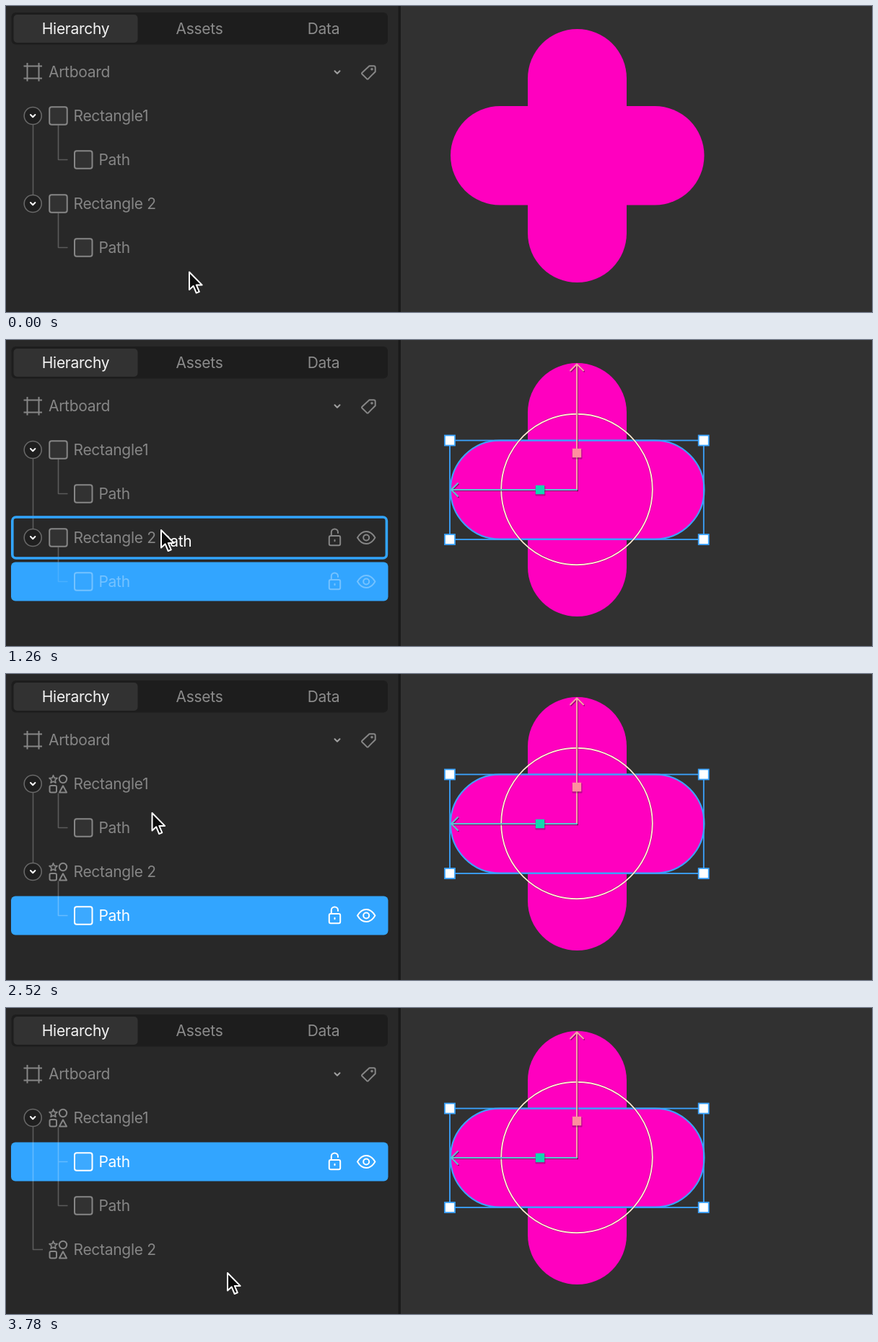
Animation, 1200 px wide and 425 px high, one loop 3990 ms. Source, as an HTML page:

```html
<!DOCTYPE html>
<html lang="en">
<head>
<meta charset="utf-8">
<title>Layer drag</title>
<style>
  html, body { margin: 0; width: 100%; height: 100%; overflow: hidden; background: #282828; }
  svg { display: block; width: 100vw; height: 100vh; }
  text { font: 400 21px Inter, "Liberation Sans", sans-serif; letter-spacing: -.3px; }
  .line { fill: none; stroke-width: 2; stroke-linecap: round; stroke-linejoin: round; }
</style>
</head>
<body>
<svg viewBox="0 0 1200 425">
  <rect width="546" height="425" fill="#282828"/>
  <rect x="546" width="654" height="425" fill="#313131"/>
  <rect x="543.5" width="3.5" height="425" fill="#1a1a1a"/>
  <rect x="7.5" y="9" width="521.5" height="44.5" rx="6" fill="#1d1d1d"/>
  <rect x="10.5" y="12" width="172" height="39" rx="5" fill="#323232"/>
  <g text-anchor="middle" fill="#8b8b8b">
    <text x="96.5" y="39.3" fill="#f4f4f4">Hierarchy</text>
    <text x="268" y="39.3">Assets</text>
    <text x="440" y="39.3">Data</text>
  </g>
  <g class="line" stroke="#868686">
    <path d="M24.5 83.5H50M24.5 100.5H50M29.5 79V104.5M45.5 79V104.5" stroke-linecap="butt"/>
    <path d="M455.5 90.2L459 93.8L462.5 90.2" stroke="#a0a0a0"/>
    <path d="M503.5 83.2H509.5Q511.7 83.2 511.7 85.4V91.2L502.2 100.9Q501 102 499.8 100.9L493.6 94.8Q492.5 93.6 493.6 92.4Z"/>
    <circle cx="507" cy="87.8" r=".8"/>
  </g>
  <text x="59" y="99.3" fill="#868686">Artboard</text>
  <g fill="#ff00bf">
    <rect x="723" y="32" width="137" height="352" rx="68.5"/>
    <rect x="616" y="139" width="351.5" height="137.5" rx="68.7"/>
  </g>
  <g id="live"></g>
</svg>
<script>
const LOOP = 3990, STEP = 70;
const GREY = '#868686', BLUE = '#32a5ff';
const ROWS = [152.5, 213.5, 274.5, 335.5];
const PRESS = 770, DRAG = 840, DROP = 2520, MOVED = 2590;

// time, x, y of the pointer tip
const TRACK = [
  [0, 253, 368], [490, 221, 343], [770, 221, 343], [840, 219.5, 342],
  [1260, 214, 262.5], [1680, 203, 219], [2240, 201.5, 191.5],
  [2520, 201.5, 191.5], [3010, 193, 236.5], [3780, 306, 366.5], [3990, 306, 366.5]
];

function slope(i, k) {
  const a = TRACK[i - 1], b = TRACK[i], c = TRACK[i + 1];
  if (!a || !c) return 0;
  const d1 = (b[k] - a[k]) / (b[0] - a[0]), d2 = (c[k] - b[k]) / (c[0] - b[0]);
  return d1 * d2 <= 0 ? 0 : 2 * d1 * d2 / (d1 + d2);
}

function pointer(t) {
  let i = 0;
  while (i < TRACK.length - 2 && t >= TRACK[i + 1][0]) i++;
  const a = TRACK[i], b = TRACK[i + 1], h = b[0] - a[0], u = (t - a[0]) / h;
  return [1, 2].map(k =>
    a[k] * (1 + 2 * u) * (1 - u) ** 2 + b[k] * u * u * (3 - 2 * u) +
    h * u * (1 - u) * (slope(i, k) * (1 - u) - slope(i + 1, k) * u));
}

const path = (d, extra = '') => `<path class="line" d="${d}" ${extra}/>`;
const box = (x, y, w, h, r, extra) =>
  `<rect x="${x}" y="${y}" width="${w}" height="${h}" rx="${r}" ${extra}/>`;
const label = (x, y, s, fill) => `<text x="${x}" y="${y + 7.3}" fill="${fill}">${s}</text>`;

const square = (x, y, c) =>
  box(x - 12, y - 12.2, 24.5, 24.5, 3, `fill="#fff" fill-opacity=".05" stroke="${c}" stroke-width="2"`);

function star(x, y) {
  let d = '';
  for (let i = 0; i < 10; i++) {
    const r = i % 2 ? 2.6 : 5.8, a = i * Math.PI / 5;
    d += (i ? 'L' : 'M') + (x + r * Math.sin(a)).toFixed(1) + ' ' + (y - r * Math.cos(a)).toFixed(1);
  }
  return d + 'Z';
}

const shapes = (x, y) => `<g class="line" stroke="${GREY}">
  <path d="${star(x - 6.5, y - 6)}" stroke-width="1.7"/>
  <circle cx="${x + 7}" cy="${y - 6.5}" r="5.2"/>
  ${box(x - 11.5, y + 2.5, 9.5, 9.5, 2, '')}
  <path d="M${x + 7} ${y + 2.8}l5 9.2h-10z"/></g>`;

const toggle = y => `<circle cx="37.2" cy="${y}" r="12" fill="#1f1f1f" stroke="#686868" stroke-width="1.6"/>` +
  path(`M34 ${y - 1.5}l3.2 3.2l3.2 -3.2`, 'stroke="#fff"');

const tools = (y, c) => `<g class="line" stroke="${c}">
  ${box(447.8, y - 2.5, 15.4, 13.2, 2.2, '')}
  <path d="M450.8 ${y - 3}v-4.5a4.6 4.6 0 0 1 9.2 0v1"/>
  <path d="M455.5 ${y + 3.2}v1.6"/>
  <path d="M487 ${y}c3.5 -6 7.5 -8.6 12.2 -8.6s8.700 2.600 12.200 8.600c-3.500 6 -7.500 8.600 -12.200 8.600s-8.700 -2.600 -12.200 -8.600z"/>
  <circle cx="499.2" cy="${y}" r="4"/></g>`;

function tree(s) {
  const [a, b, c, d] = ROWS;
  const selected = s.moved ? b : d;
  let out = '';
  if (s.selected) out += box(7, selected - 27, 522.5, 54, 6, `fill="${BLUE}"`);

  const dim = s.drag ? .12 : .26;
  const wire = (p, o = .24) => path(p, `stroke="#fff" stroke-opacity="${o}" style="stroke-width:1.6;stroke-linecap:butt"`);
  if (s.moved) {
    out += wire(`M37.500 ${a + 12.500}V${d}H51`) + wire(`M72.500 ${a + 13}V${c}H85.500M73.300 ${b}H85.500`);
  } else {
    out += wire(`M37.500 ${a + 12.500}V${c - 12.500}`) + wire(`M72.500 ${a + 13}V${b}H85.500`);
    out += s.selected
      ? wire(`M72.500 ${c + 13}V${d - 27}`) + wire(`M72.500 ${d - 27}V${d}H85.500`, dim)
      : wire(`M72.500 ${c + 13}V${d}H85.500`);
  }

  const group = (y, name, open) => (open ? toggle(y) : '') +
    (s.converted ? shapes(72, y) : square(72.2, y, GREY)) + label(93.5, y, name, GREY);
  const leaf = y => {
    const on = s.selected && y === selected, color = on ? '#fff' : GREY;
    const body = square(107, y, color) + label(128.5, y, 'Path', color) + (on ? tools(y, color) : '');
    return `<g opacity="${on && s.drag ? .32 : 1}">${body}</g>`;
  };
  out += group(a, 'Rectangle1', true) + leaf(b) +
    group(s.moved ? d : c, 'Rectangle 2', !s.moved) + leaf(s.moved ? c : d);

  if (s.hover !== null && !(s.selected && s.hover === selected)) out += tools(s.hover, GREY);
  if (s.target) out += box(8.8, s.target - 28.5, 518.6, 57, 5, `fill="none" stroke="${BLUE}" stroke-width="3.600"`);
  return out;
}

function gizmo() {
  const up = 'M791 208V33.500M782 42.500L791 33.500L800 42.500';
  const left = 'M791 208H617M626 199L617 208L626 217';
  const knob = (x, y, c) => box(x - 6.5, y - 5.500, 14, 14, 1, 'fill="#000" opacity=".25"') +
    box(x - 6.2, y - 6.2, 12.4, 12.4, 0, `fill="${c}"`);
  const shade = 'stroke="#000" opacity=".4" transform="translate(1 1.200)"';
  let out = box(615, 139.5, 351.8, 137.5, 0, `fill="none" stroke="#3ba4ff" stroke-width="1.800"`);
  for (const x of [615, 966.7]) for (const y of [139.5, 277])
    out += box(x - 7, y - 7, 14, 14, 0, `fill="#fff" stroke="#3ba4ff" stroke-width="1.800"`);
  out += '<circle cx="791" cy="207.500" r="104.800" fill="none" stroke="#000" stroke-opacity=".2" stroke-width="3.500"/>' +
    '<circle cx="791" cy="207.500" r="104.800" fill="none" stroke="#ffe8cf" stroke-width="1.900"/>';
  out += path(up, shade) + path(left, shade) +
    path(up, 'stroke="#f5a3a8"') + path(left, 'stroke="#5cc3cf"');
  return out + knob(791, 157, '#ff8f9f') + knob(740, 208, '#12d6ae');
}

const outline = wide => wide
  ? box(616, 139.500, 351.500, 137, 68.500, 'fill="none" stroke="#3ba4ff" stroke-width="2"')
  : box(723, 32, 137.200, 352, 68.600, 'fill="none" stroke="#3ba4ff" stroke-width="2"');

const arrow = (x, y) => `<path transform="translate(${x.toFixed(1)} ${y.toFixed(1)})"
  d="M1 1.500V26L6.700 20.800L10.700 30.500L14.800 28.800L10.800 19.400H18.600Z"
  fill="#0c0c0c" stroke="#fff" stroke-width="2" stroke-linejoin="round"/>`;

function draw(t) {
  const [x, y] = pointer(t);
  const drag = t >= DRAG && t < DROP;
  const over = ROWS.find(r => y >= r - 30.500 && y < r + 30.500) ?? null;
  const s = {
    drag,
    selected: t >= PRESS,
    converted: t >= DROP,
    moved: t >= MOVED,
    target: drag && over < ROWS[3] ? over : 0,
    hover: t < DROP && over === ROWS[1] || t === DROP ? null : over
  };
  const onTall = s.target === ROWS[1] || s.moved && over === ROWS[2];
  const onWide = s.selected || over === ROWS[3];
  live.innerHTML = tree(s) +
    (onTall ? outline(false) : '') + (onWide ? outline(true) : '') +
    (s.selected ? gizmo() : '') +
    (drag ? label(x + .2, y + 17.500, 'Path', '#fff') : '') + arrow(x, y);
}

const live = document.getElementById('live');
const start = performance.now();
let last = -1;
function tick() {
  const t = Math.max(0, performance.now() - start) % LOOP;
  const now = Math.min(3780, Math.floor(t / STEP) * STEP);
  if (now !== last) draw(last = now);
  requestAnimationFrame(tick);
}
tick();
</script>
</body>
</html>
```
